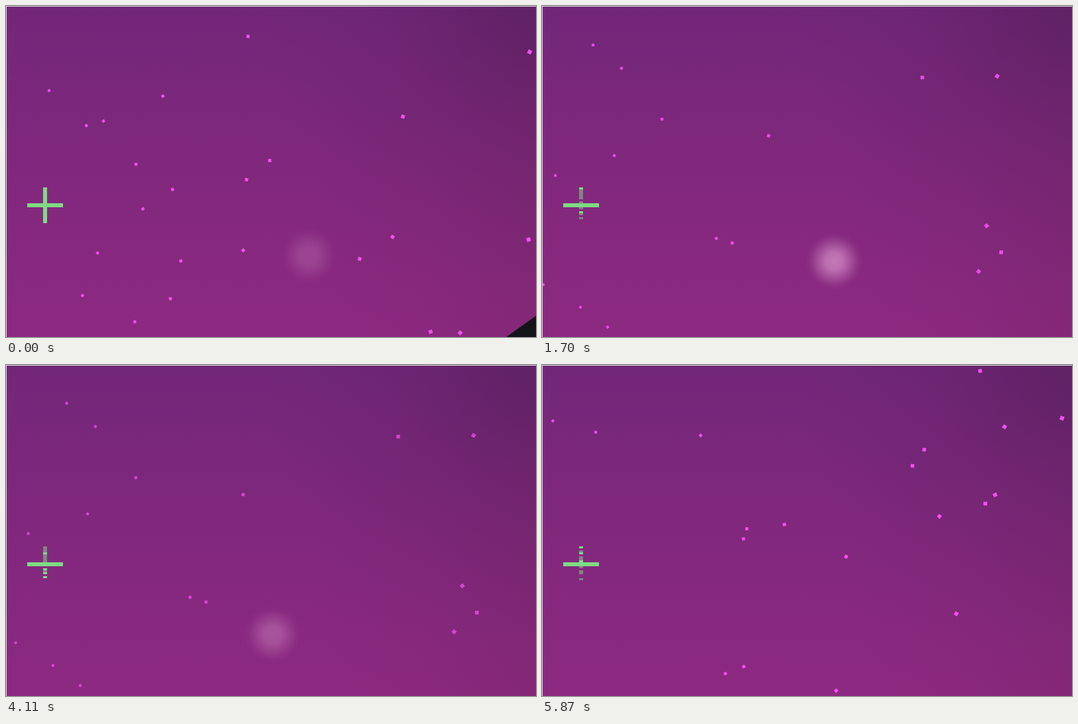
An HTML page with a canvas that plays this animation: 800 by 500 pixels, repeating every 5.91 s.

```html
<!DOCTYPE html>
<html lang="en">
<head>
<meta charset="utf-8">
<title>Star turn</title>
<style>
html, body { margin: 0; width: 100%; height: 100%; overflow: hidden; background: #7d277a; }
canvas { display: block; }
</style>
</head>
<body>
<canvas id="stage" width="800" height="500"></canvas>
<script>
const ctx = document.getElementById('stage').getContext('2d');
const LOOP = 5.91, CALM = 0.69, STILL = 1.69, WHIP = 5.56;
const PIVOT_X = -230;   // the sky turns about a point left of the stage, at y 0
const GREEN = '#7ddc83', GRAY = '#7f8585';

const lerp = (a, b, k) => a + (b - a) * k;
const clamp = v => Math.min(1, Math.max(0, v));

function random(seed) {
  const v = Math.sin(seed * 127.1 + 11.7) * 43758.5453;
  return v - Math.floor(v);
}

const scatter = (count, seed) => Array.from({ length: count }, (_, i) =>
  [800 * random(seed + 2 * i), 500 * random(seed + 2 * i + 1)]);

const opening = scatter(23, 5);
const closing = scatter(19, 300);

// Where the main stars come to rest, some of them just off the stage
const resting = [
  [77, 59], [120, 94], [181, 171], [109, 226], [20, 256], [342, 196], [263, 351],
  [287, 358], [671, 332], [693, 372], [659, 401], [574, 108], [687, 106], [2, 421],
  [58, 455], [99, 485], [88, 511], [503, 515], [735, 545]
];

// Angle turned since the loop began, slowing to a steady 0.1 rad/s
const spin = t => 1.15 * (1 - (1 - clamp(t / CALM)) ** 3) + 0.1 * t;
const whip = t => 4.2 * (t - WHIP);

function rotate([x, y], angle) {
  const c = Math.cos(angle), s = Math.sin(angle), dx = x - PIVOT_X;
  return [PIVOT_X + dx * c - y * s, dx * s + y * c];
}

// The last part of the turn, from k = 0 to rest at k = 1
function settle([x, y], k) {
  const back = 1 - k;
  return [x + back * (2.8 + .021 * x + .088 * y), y - back * (24.5 + .1 * x - .008 * y)];
}

function drift([x, y], seconds) {
  const k = seconds / 3.44;
  return [x + k * (20.5 + .01 * x - .006 * y), y + k * (-2 + .0025 * x + .0000123 * x * y)];
}

function mainPlace(star, t) {
  if (t < CALM) return rotate(settle(star, 0), spin(t) - spin(CALM));
  if (t < STILL) return settle(star, (t - CALM) / (STILL - CALM));
  const place = drift(star, Math.min(t, WHIP) - STILL);
  return t < WHIP ? place : rotate(place, whip(t));
}

// Stars grow toward the right
function drawStars(stars, place) {
  stars.forEach((star, i) => {
    const size = 3.8 + star[0] * .0028;
    ctx.save();
    ctx.translate(...place(star));
    ctx.rotate(i * 0.7);
    ctx.fillRect(-size / 2, -size / 2, size, size);
    ctx.restore();
  });
}

function fade(gradient, ...stops) {
  stops.forEach(([at, color]) => gradient.addColorStop(at, color));
  ctx.fillStyle = gradient;
  ctx.fillRect(0, 0, 800, 500);
}

function sky() {
  const side = a => `rgba(90,30,70,${a})`, corner = a => `rgba(75,27,85,${a})`;
  fade(ctx.createLinearGradient(0, 0, 0, 500), [0, '#722779'], [.5, '#81287d'], [1, '#8d2981']);
  fade(ctx.createLinearGradient(450, 0, 800, 0), [0, side(0)], [.5, side(.05)], [1, side(.17)]);
  fade(ctx.createRadialGradient(800, 0, 0, 800, 0, 420), [0, corner(.42)], [.5, corner(.13)], [1, corner(0)]);
}

// Time and strength of the glow
const pulse = [[0, .19], [CALM, .1], [1.7, .5], [2.4, .46], [4.11, .28], [5.05, 0], [LOOP, 0]];

function glow(t) {
  const next = pulse.findIndex(p => p[0] > t);
  const [[t0, a0], [t1, a1]] = [pulse[next - 1], pulse[next]];
  const alpha = lerp(a0, a1, (t - t0) / (t1 - t0));
  const x = 457 - 6.5 * t - 1.65 * t * t, y = 377 + 3.5 * t + .93 * t * t;
  const tint = a => `rgba(255,200,240,${a * alpha})`;
  fade(ctx.createRadialGradient(x, y, 0, x, y, 43),
    [0, tint(1)], [.3, tint(.88)], [.6, tint(.45)], [.85, tint(.1)], [1, tint(0)]);
}

function ridge(t) {
  ctx.fillStyle = '#131418';
  ctx.beginPath();
  [[755, 500], [845, 436], [900, 560], [760, 560]]
    .forEach(corner => ctx.lineTo(...rotate(corner, spin(t))));
  ctx.fill();
}

// The upright breaks up into flickering rows, worst at its foot
function cross(t) {
  const wear = clamp(t / 2), step = Math.floor(t / 0.62);
  for (let i = 0; i < 18; i++) {
    const loss = wear * (random(900 + step * 18 + i) + i / 40);
    if (loss > 0.85) continue;
    ctx.fillStyle = loss > 0.45 ? GRAY : GREEN;
    ctx.fillRect(56, 274 + 3 * i, 6, 3);
  }
  ctx.fillStyle = GREEN;
  ctx.fillRect(32, 298, 54, 6);
}

function draw(t) {
  sky();
  glow(t);
  if (t < CALM) ridge(t);

  ctx.fillStyle = '#f24ff0';
  if (t < CALM) drawStars(opening, star => rotate(star, spin(t)));
  if (t > WHIP) drawStars(closing, star => rotate(star, whip(t) - whip(5.87)));
  ctx.globalAlpha = lerp(1, .75, clamp((t - CALM) / 3));
  drawStars(resting, star => mainPlace(star, t));
  ctx.globalAlpha = 1;

  cross(t);
  ctx.fillStyle = '#dcdfdc';
  ctx.fillRect(0, 0, 800, 1);
  ctx.fillRect(0, 0, 1, 500);
}

let start;
function tick(now) {
  start ??= now;
  draw(Math.max(0, now - start) / 1000 % LOOP);
  requestAnimationFrame(tick);
}
draw(0);
requestAnimationFrame(tick);
</script>
</body>
</html>
```
